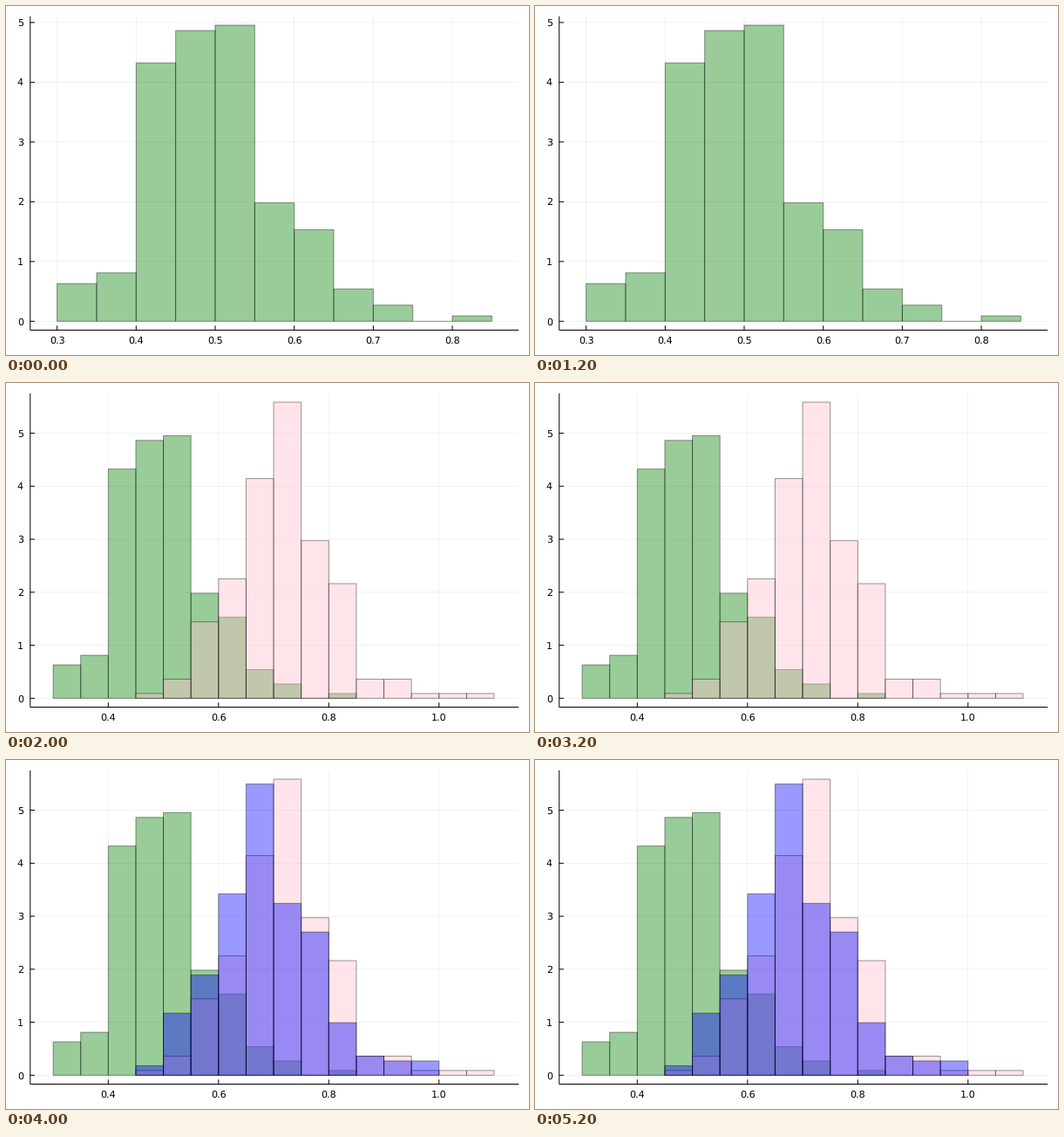
Animation, 600 px wide and 400 px high, one loop 6000 ms. Source, as a matplotlib script:

```python
import matplotlib.pyplot as plt
from matplotlib.animation import FuncAnimation
from matplotlib.patches import Rectangle

WIDTH, HEIGHT, DPI = 600, 400, 100
LEFT, RIGHT, TOP, BOTTOM = 27.8, 588.2, 11.8, 371.5
PX = 72 / DPI  # one pixel in points
BIN = 0.05
TICK = 5.2

plt.rcParams["font.family"] = "DejaVu Sans"
plt.rcParams["text.hinting"] = "none"

# first bin edge, fill colour, counts per bin
GREEN = (0.30, (0, 128 / 255, 0), [7, 9, 48, 54, 55, 22, 17, 6, 3, 0, 1])
PINK = (0.45, (1, 192 / 255, 203 / 255),
        [1, 4, 16, 25, 46, 62, 33, 24, 4, 4, 1, 1, 1])
BLUE = (0.45, (0, 0, 1), [2, 13, 21, 38, 61, 36, 30, 11, 4, 3, 3])

NARROW = ((0.26601, 0.88399), [0.3, 0.4, 0.5, 0.6, 0.7, 0.8])
WIDE = ((0.25842, 1.14458), [0.4, 0.6, 0.8, 1.0])
SCENES = [
    ([GREEN], *NARROW),
    ([GREEN, PINK], *WIDE),
    ([GREEN, PINK, BLUE], *WIDE),
]

fig = plt.figure(figsize=(WIDTH / DPI, HEIGHT / DPI), dpi=DPI, facecolor="white")
ax = fig.add_axes([0, 0, 1, 1])


def density(counts):
    return [c / (sum(counts) * BIN) for c in counts]


def line(x0, y0, x1, y1, width=1.0, alpha=1.0):
    ax.plot([x0, x1], [y0, y1], color="black", lw=width * PX, alpha=alpha,
            solid_capstyle="butt", snap=False, zorder=1)


def label(x, y, text, ha):
    ax.text(x, y, text, fontsize=8, ha=ha, va="baseline")


def draw(index):
    series, (x_lo, x_hi), x_ticks = SCENES[index]
    peak = max(max(density(counts)) for _, _, counts in series)
    x_scale = (RIGHT - LEFT) / (x_hi - x_lo)
    y_scale = (BOTTOM - TOP) / (1.06 * peak)
    base = BOTTOM - 0.03 * peak * y_scale

    def to_x(v):
        return LEFT + (v - x_lo) * x_scale

    def to_y(v):
        return base - v * y_scale

    ax.clear()
    ax.set_xlim(0, WIDTH)
    ax.set_ylim(HEIGHT, 0)
    ax.axis("off")

    for v in x_ticks:
        x = to_x(v)
        line(x, TOP, x, BOTTOM, 0.5, 0.1)
        line(x, BOTTOM, x, BOTTOM - TICK)
        label(x, 387, f"{v:.1f}", "center")
    for v in range(6):
        y = to_y(v)
        if y < TOP:
            continue
        line(LEFT, y, RIGHT, y, 0.5, 0.1)
        line(LEFT, y, LEFT + TICK, y)
        label(20, y + 4.05, str(v), "right")
    line(LEFT, BOTTOM, RIGHT, BOTTOM)
    line(LEFT, BOTTOM, LEFT, TOP)

    for start, color, counts in series:
        for i, h in enumerate(density(counts)):
            ax.add_patch(Rectangle(
                (to_x(start + i * BIN), base), BIN * x_scale, -h * y_scale,
                facecolor=(*color, 0.4), edgecolor=(0, 0, 0, 0.4),
                lw=PX, snap=False, zorder=2))
    return []


anim = FuncAnimation(fig, draw, frames=len(SCENES), interval=2000,
                     init_func=lambda: [], repeat=True, repeat_delay=0)
plt.show()
```
